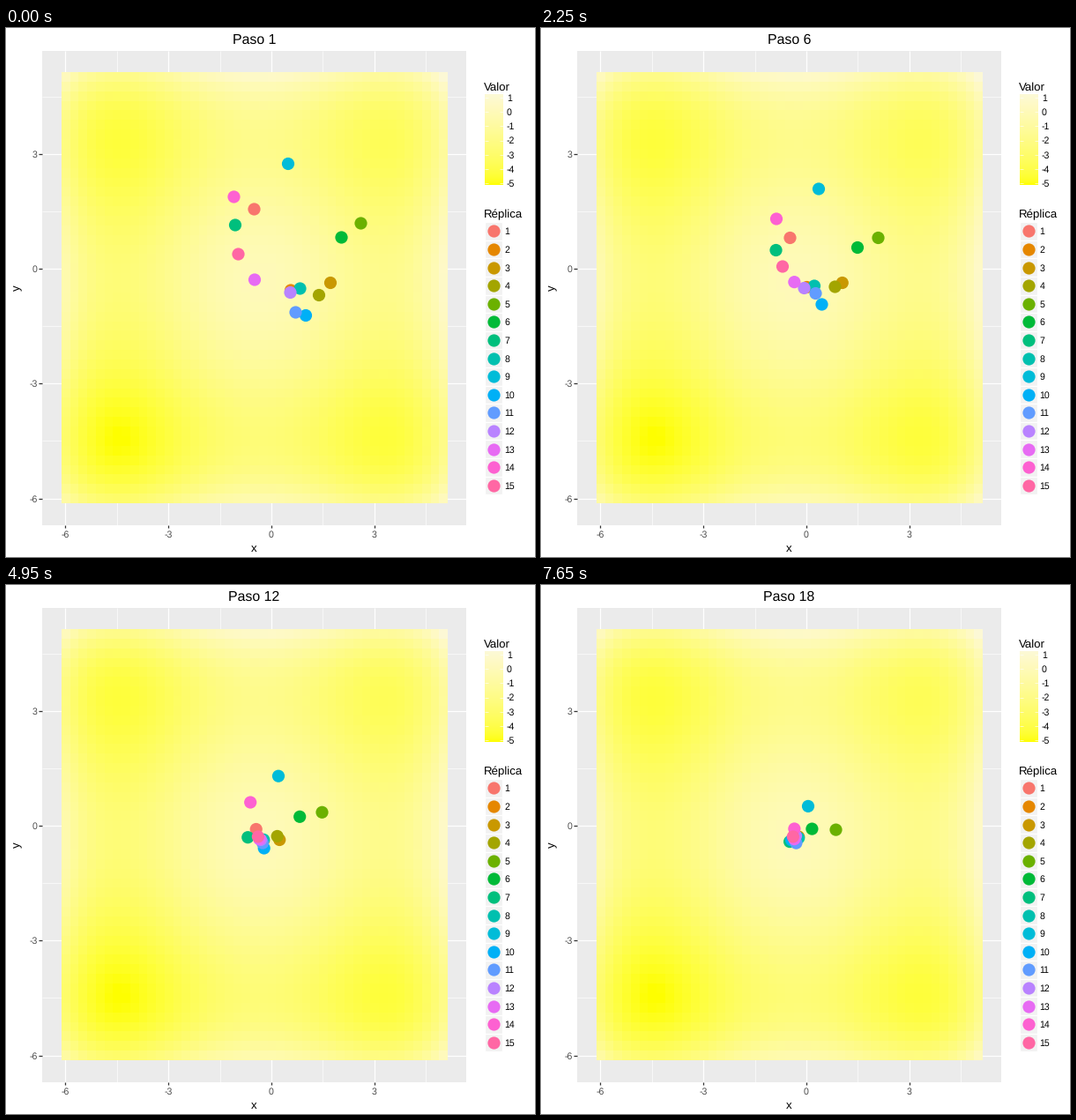
A matplotlib script for the animation above (8 s loop, 600 by 600 pixels).

```python
import numpy as np
import matplotlib.pyplot as plt
from matplotlib.animation import FuncAnimation
from matplotlib.colors import ListedColormap
from matplotlib.patches import Rectangle

SIZE, DPI = 600, 100
PT = 72 / DPI                      # points per pixel
FRAME_MS, STEP_MS, LOOP_MS = 50, 450, 8000
X0, SX, Y0, SY = 301, 38.93, 273, 43.44
LOW, HIGH, CELL = -6, 5, 0.25
PEAK = -0.35

# Each climber: start x, y and pace along x, y, in pixels and pixels per step
CLIMBERS = np.array([
    (281.5, 205.5, 0.2, 6.5), (323, 297.5, 4.3, 0.7), (368, 289, 5.25, 0),
    (355, 303, 4.3, 1.9), (402.5, 221.5, 4, 3.3), (380.5, 237.5, 4.3, 2.3),
    (260, 223.5, 1.3, 5.7), (333.5, 295.5, 4.7, 0.6), (320, 154, 1, 5.7),
    (340, 326, 4.3, 2.5), (328.5, 322.5, 3.4, 4.3), (322.5, 300, 4.8, 1),
    (282, 285.5, 3, 0.6), (258.5, 191.5, 1.7, 5), (263.5, 256.5, 2.1, 2.8)])
START, PACE = CLIMBERS[:, :2], CLIMBERS[:, 2:]
COUNT = len(CLIMBERS)

M = np.array([[0.4124, 0.3576, 0.1805],
              [0.2126, 0.7152, 0.0722],
              [0.0193, 0.1192, 0.9505]])
WHITE = M.sum(axis=1)


def xyz_to_rgb(xyz):
    lin = np.clip(np.linalg.solve(M, xyz), 0, 1)
    return np.where(lin > 0.0031308, 1.055 * lin ** (1 / 2.4) - 0.055, 12.92 * lin)


def to_lab(rgb):
    c = np.array(rgb) / 255
    lin = np.where(c > 0.04045, ((c + 0.055) / 1.055) ** 2.4, c / 12.92)
    t = M @ lin / WHITE
    f = np.where(t > 0.008856, np.cbrt(t), 7.787 * t + 16 / 116)
    return np.array([116 * f[1] - 16, 500 * (f[0] - f[1]), 200 * (f[1] - f[2])])


def lab_to_rgb(lab):
    fy = (lab[0] + 16) / 116
    f = np.array([fy + lab[1] / 500, fy, fy - lab[2] / 200])
    return xyz_to_rgb(WHITE * np.where(f > 0.2069, f ** 3, (f - 16 / 116) / 7.787))


def hcl(hue, chroma=100, lum=65):
    h = np.radians(hue)
    u = chroma * np.cos(h) / (13 * lum) + 0.1978
    v = chroma * np.sin(h) / (13 * lum) + 0.4683
    y = ((lum + 16) / 116) ** 3
    return xyz_to_rgb(y * np.array([9 * u, 4 * v, 12 - 3 * u - 20 * v]) / (4 * v))


def gradient(start, end, n=256):
    a, b = to_lab(start), to_lab(end)
    return ListedColormap([lab_to_rgb(a + (b - a) * t) for t in np.linspace(0, 1, n)])


def px(x):
    return X0 + SX * x


def py(y):
    return Y0 - SY * y


def well(v):
    return ((v + 0.5) ** 4 - 30 * v ** 2 - 20 * v) / 100


def rect(x, y, w, h, face, edge="none", lw=0):
    ax.add_patch(Rectangle((x, y), w, h, fc=face, ec=edge, lw=lw * PT))


def line(xs, ys, color, width, **kw):
    ax.plot(xs, ys, color=color, lw=width * PT, solid_capstyle="butt", **kw)


def text(x, y, s, size, color="black", ha="left", va="baseline", **kw):
    return ax.text(x, y, s, fontsize=size * PT, color=color, ha=ha, va=va, **kw)


plt.rcParams["font.family"] = "Liberation Sans"
plt.rcParams["text.hinting"] = "none"
fig = plt.figure(figsize=(SIZE / DPI, SIZE / DPI), dpi=DPI, facecolor="white")
ax = fig.add_axes([0, 0, 1, 1])
ax.axis("off")

# Panel and grid
edge = CELL / 2 + (HIGH - LOW + CELL) * 0.05
left, right = px(LOW - edge), px(HIGH + edge)
top, bottom = py(HIGH + edge), py(LOW - edge)
rect(left, top, right - left, bottom - top, "#EBEBEB")
for v in np.arange(-6, 5, 1.5):
    width = 1.28 if v % 3 == 0 else 0.64
    line([px(v)] * 2, [top, bottom], "white", width, zorder=1.1)
    line([left, right], [py(v)] * 2, "white", width, zorder=1.1)

# Surface
grid = np.arange(LOW, HIGH + CELL / 2, CELL)
values = well(grid)[:, None] + well(grid)[None, :]
cmap = gradient((255, 255, 0), (252, 249, 214))
half = CELL / 2
ax.imshow(values, cmap=cmap, origin="lower", interpolation="nearest", aspect="auto",
          extent=(px(LOW - half), px(HIGH + half), py(LOW - half), py(HIGH + half)),
          zorder=1.5)

# Axes
for v in (-6, -3, 0, 3):
    line([px(v)] * 2, [bottom, bottom + 3.3], "#333333", 1.28)
    line([left - 3.3, left], [py(v)] * 2, "#333333", 1.28)
    text(px(v), 577.5, str(v), 10.56, "#4D4D4D", ha="center")
    text(35.6, py(v) + 3.8, str(v), 10.56, "#4D4D4D", ha="right")
middle = (left + right) / 2
text(middle, 594, "x", 13.2, ha="center")
text(13.3, (top + bottom) / 2, "y", 13.2, ha="center", va="center", rotation=90)

# Colour bar
text(542.4, 70.8, "Valor", 13.2)
ax.imshow(np.linspace(1, 0, 256)[:, None], cmap=cmap, aspect="auto",
          interpolation="bilinear", extent=(543, 564, 178.5, 75.8), zorder=1.5)
for i, v in enumerate(range(1, -6, -1)):
    y = 79 + 16.2 * i
    for x in (543, 559.9):
        line([x, x + 4.1], [y, y], "white", 0.6)
    text(568, y + 3.7, str(v), 10.56)

# Replica key
HUES = [hcl(15 + 360 / COUNT * i) for i in range(COUNT)]
DOT = (14.2 * PT) ** 2
text(542.4, 215.3, "Réplica", 13.2)
for i, hue in enumerate(HUES):
    y = 230.4 + 20.6 * i
    rect(542.8, y - 10.3, 20.6, 20.6, "#F2F2F2", "white", 1.28)
    ax.scatter([553.1], [y], s=DOT, color=[hue], lw=0, zorder=3)
    text(565.6, y + 3.8, str(i + 1), 10.56)

title = text(middle, 18.3, "", 15.84, ha="center")
dots = ax.scatter(*START.T, s=DOT, c=HUES, lw=0, zorder=4)
ax.set_xlim(0, SIZE)
ax.set_ylim(SIZE, 0)

# Every climber settles somewhere close to the peak
scatter = np.random.default_rng(4).uniform(-5, 5, START.shape)
gap = np.array([px(PEAK), py(PEAK)]) + scatter - START


def update(frame):
    step = frame * FRAME_MS // STEP_MS
    title.set_text(f"Paso {step + 1}")
    dots.set_offsets(START + np.sign(gap) * np.minimum(np.abs(gap), PACE * step))
    return title, dots


anim = FuncAnimation(fig, update, frames=LOOP_MS // FRAME_MS, interval=FRAME_MS,
                     init_func=lambda: update(0), repeat=True, repeat_delay=0)
plt.show()
```
